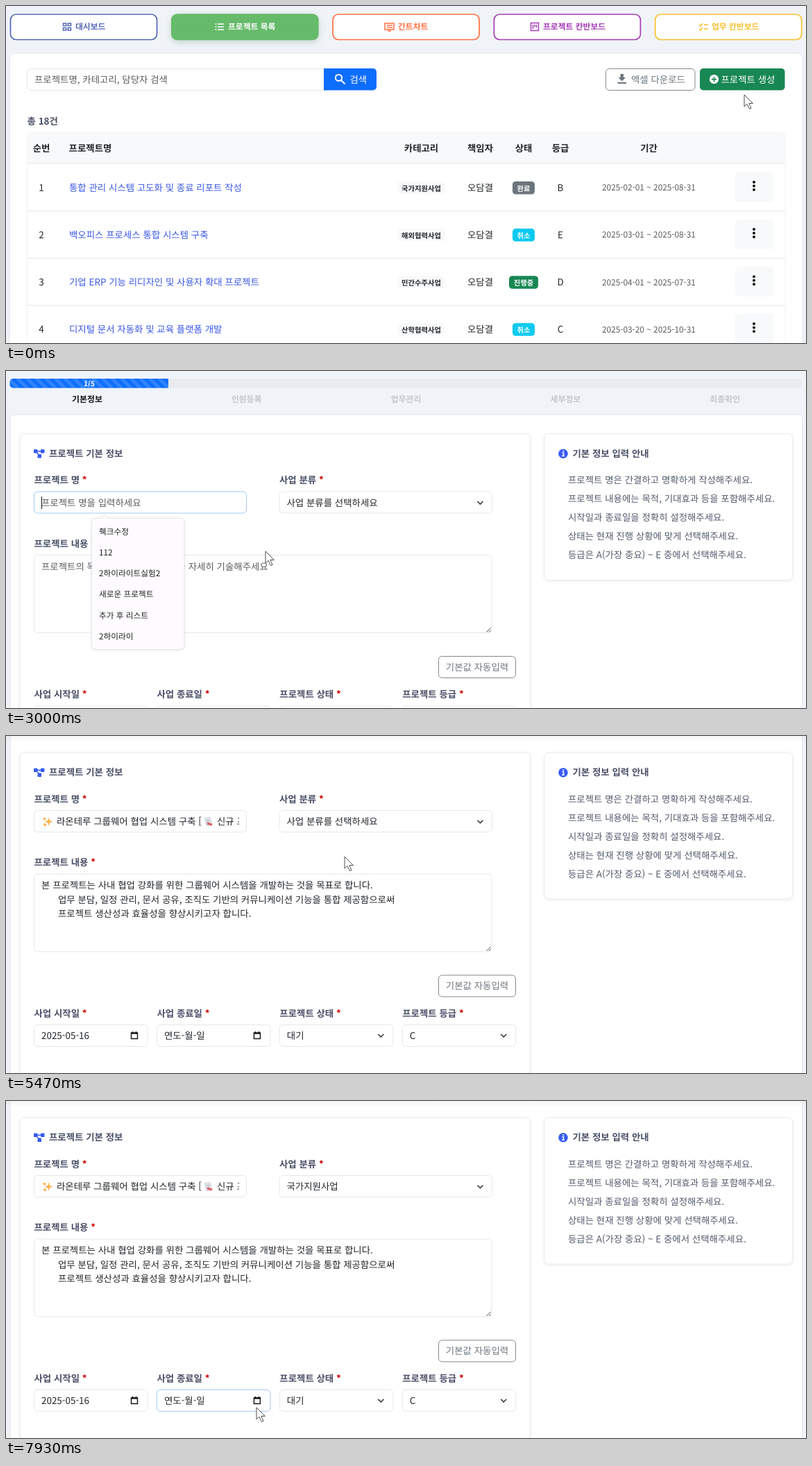
Write an HTML page that moves like this. It is 1153 px wide and 486 px high and loops after 8 s.

```html
<!DOCTYPE html>
<html lang="ko">
<head>
<meta charset="utf-8">
<style>
  html, body { margin: 0; width: 100%; height: 100%; overflow: hidden; background: #fefefe; }
  svg { display: block; width: 100%; height: 100%; }
  text { font-family: "Noto Sans CJK KR", "Noto Sans KR", "Noto Sans CJK", sans-serif; text-rendering: geometricPrecision; }
  .soft { filter: drop-shadow(0 1px 2px rgba(0,0,0,.08)); }
  .lift { filter: drop-shadow(0 3px 5px rgba(60,90,60,.22)); }
  .deep { filter: drop-shadow(0 12px 10px rgba(0,0,0,.16)); }
</style>
</head>
<body>
<svg id="stage" viewBox="0 0 1153 486" stroke-width=".85"></svg>
<script>
const INK = '#212529', SLATE = '#4b5068', GRAY = '#6c757d', HINT = '#595c60',
      LINE = '#dfe3e8', BLUE = '#365cf5', FOCUS = '#93bffe', SCROLL = 66.5, SIZE = 13.44;

// y is the visual middle of the line
const text = (x, y, s, fill = INK, size = SIZE, bold = 0, anchor = 'start') =>
  `<text x="${x}" y="${y + size * .37}" fill="${fill}" font-size="${size}" font-weight="${bold ? 700 : 400}" text-anchor="${anchor}">${s}</text>`;
const mid = (x, y, s, fill, size, bold) => text(x, y, s, fill, size, bold, 'middle');
const box = (x, y, w, h, fill, stroke = 'none', r = 5, more = '') =>
  `<rect x="${x}" y="${y}" width="${w}" height="${h}" rx="${r}" fill="${fill}" stroke="${stroke}" ${more}/>`;
const path = (d, stroke, w = 1.5, fill = 'none') =>
  `<path d="${d}" stroke="${stroke}" stroke-width="${w}" fill="${fill}"/>`;
const dot = (x, y, r, fill) => `<circle cx="${x}" cy="${y}" r="${r}" fill="${fill}"/>`;
const group = (id, s) => `<g id="${id}">${s}</g>`;

/* ---------- project list ---------- */
const tabs = [
  ['대시보드', '#5468b8', 100, 'M82.5 25h4.2v3.6h-4.2zM89.3 25h4.2v3.6h-4.2zM82.5 31.4h4.2V35h-4.2zM89.3 31.4h4.2V35h-4.2z'],
  ['프로젝트 목록', '#66bb6a', 320, 'M301.5 26h2M305 26h9M301.5 30h2M305 30h9M301.5 34h2M305 34h9'],
  ['간트차트', '#ff7043', 565, 'M546 25h13v9h-13zM550 36h5M549 28h8M549 31h8'],
  ['프로젝트 칸반보드', '#a63cb8', 774, 'M756.5 24.5h11v11h-11zM759.5 27v6M762 27v3M764.5 27v4'],
  ['업무 칸반보드', '#fbc02d', 1017, 'M999 27l2 2 3-4M999 33l2 2 3-4M1006 27h6M1006 33h6']
];
const rows = [
  ['통합 관리 시스템 고도화 및 종료 리포트 작성', '국가지원사업', '완료', GRAY, 'B', '2025-02-01 ~ 2025-08-31'],
  ['백오피스 프로세스 통합 시스템 구축', '해외협력사업', '취소', '#0dcaf0', 'E', '2025-03-01 ~ 2025-08-31'],
  ['기업 ERP 기능 리디자인 및 사용자 확대 프로젝트', '민간수주사업', '진행중', '#198754', 'D', '2025-04-01 ~ 2025-07-31'],
  ['디지털 문서 자동화 및 교육 플랫폼 개발', '산학협력사업', '취소', '#0dcaf0', 'C', '2025-03-20 ~ 2025-10-31']
];

const tab = ([name, color, x, icon], i) => {
  const on = i === 1, ink = on ? '#fff' : color;
  return box(6.5 + i * 232.3, 12, 211, 36.5, on ? color : '#fff', color, 8, `stroke-width="1.7" class="${on ? 'lift' : ''}"`)
    + path(icon, ink) + text(x, 30, name, ink, 11.8, 1);
};
const row = ([name, kind, state, color, grade, dates], i) => {
  const y = 262 + i * 68.1, w = state.length * 10 + 12;
  return mid(51, y, i + 1) + text(91, y, name, '#3a57e8')
    + box(564, y - 9, 69, 18, '#f8f9fa') + mid(598.5, y + 1, kind, INK, 10.3, 1)
    + mid(683.5, y, '오담결')
    + box(746 - w / 2, y - 9, w, 18.5, color, 'none', 4.5) + mid(746, y + 1, state, '#fff', 10.3, 1)
    + mid(799, y, grade) + mid(926.5, y, dates, HINT, 11.85)
    + box(1051, y - 22, 55, 42.5, '#f8f9fa', 'none', 4)
    + [-8, -2.5, 3].map(d => dot(1078, y + d, 2, '#111')).join('')
    + path(`M30.5 ${y + 33.5}H1123`, '#e6e8eb', 1);
};
const heads = [[51, '순번'], [121.5, '프로젝트명'], [598.5, '카테고리'], [683.5, '책임자'], [746, '상태'], [799, '등급'], [926.5, '기간']];

const list = box(0, 0, 1153, 486, '#f0f4f8', 'none', 0)
  + tabs.map(tab).join('')
  + box(6, 69, 1141.5, 440, '#fff', 'none', 6, 'class="soft"')
  + box(30.5, 90.5, 440, 31, '#fff', LINE) + text(41, 106, '프로젝트명, 카테고리, 담당자 검색', HINT)
  + path('M458 90h71a5 5 0 0 1 5 5v21.5a5 5 0 0 1-5 5h-71z', 'none', 0, '#0d6efd')
  + `<circle cx="479.5" cy="103.5" r="4.6" fill="none" stroke="#fff" stroke-width="2"/>` + path('M483 107l5.5 5.5', '#fff', 2.2)
  + text(495.5, 106, '검색', '#fff')
  + box(864.5, 90.5, 128.5, 31, '#fff', GRAY)
  + path('M885.5 98h4.5v5h3l-5.25 5.5-5.25-5.5h3zM881.5 110h12.5v2h-12.5z', 'none', 0, GRAY)
  + text(901, 106, '엑셀 다운로드', GRAY)
  + box(1000, 90, 122.5, 31.5, '#198754', 'none', 5, 'id="create"')
  + dot(1020.5, 105.7, 6.6, '#fff') + path('M1017 105.7h7M1020.5 102.2v7', '#198754', 1.7)
  + text(1030.5, 106, '프로젝트 생성', '#fff')
  + text(30.5, 166, '총 18건', SLATE, SIZE, 1)
  + box(30.5, 182, 1092.5, 330, '#fff', '#f0f1f3', 4)
  + box(30.5, 182, 1092.5, 45, '#f8f9fa', 'none', 4) + path('M30.5 227H1123', '#e6e8eb', 1)
  + heads.map(([x, s]) => mid(x, 205.5, s, INK, SIZE, 1)).join('')
  + rows.map(row).join('');

/* ---------- form ---------- */
const label = (x, y, s) => text(x, y, s + ' <tspan fill="#d00000">*</tspan>', SLATE, SIZE, 1);
const field = (id, x, y, w, h = 31) => box(x, y, w, h, '#fff', LINE, 5, `id="${id}"`);
const chevron = (x, y) => path(`M${x - 4} ${y - 2}l4 4 4-4`, '#343a40', 1.6);
const calendar = (x, y) => path(`M${x - 4.5} ${y - 4}h9v8.5h-9zM${x - 4.5} ${y - 3}h9M${x - 2.5} ${y - 6}v2M${x + 2.5} ${y - 6}v2`, '#111', 1.4);
const steps = ['기본정보', '인원등록', '업무관리', '세부정보', '최종확인'];
const tips = ['프로젝트 명은 간결하고 명확하게 작성해주세요.', '프로젝트 내용에는 목적, 기대효과 등을 포함해주세요.',
  '시작일과 종료일을 정확히 설정해주세요.', '상태는 현재 진행 상황에 맞게 선택해주세요.', '등급은 A(가장 중요) ~ E 중에서 선택해주세요.'];
const history = ['췍크수정', '112', '2하이라이트싫험2', '새로운 프로젝트', '추가 후 리스트', '2하이라이'];
const options = ['사업 분류를 선택하세요', '국가지원사업', '법인자체사업', '산학협력사업', '민간수주사업', '해외협력사업'];
const lows = [['사업 시작일', '2025-05-16'], ['사업 종료일', '연도-월-일'], ['프로젝트 상태', '대기'], ['프로젝트 등급', 'C']];
const spark = (x, y, r) => path(`M${x} ${y - r}Q${x} ${y} ${x + r} ${y}Q${x} ${y} ${x} ${y + r}Q${x} ${y} ${x - r} ${y}Q${x} ${y} ${x} ${y - r}`, '#f7a93b', 1, '#fbb848');

const filled = spark(61.5, 190, 5) + spark(55.5, 186, 2) + spark(56, 194.5, 2)
  + text(73, 190, '라온테루 그룹웨어 협업 시스템 구축 [')
  + path('M286.5 184.500l7.500-.5 3 11-8.500 1z', '#cfd5de', 1, '#e4e8ee') + path('M288.5 188h5M289 191h4', '#9aa4b2', 1)
  + path('M290 192.5l7 2', '#e0606c', 3)
  + `<clipPath id="edge"><path d="M40 174H336V206H40z"/></clipPath><g clip-path="url(#edge)">${text(304, 190, '신규 프로젝트')}</g>`
  + text(51, 282, '본 프로젝트는 사내 협업 강화를 위한 그룹웨어 시스템을 개발하는 것을 목표로 합니다.')
  + text(75, 302.3, '업무 분담, 일정 관리, 문서 공유, 조직도 기반의 커뮤니케이션 기능을 통합 제공함으로써')
  + text(75, 322.5, '프로젝트 생산성과 효율성을 향상시키고자 합니다.');

const bar = fill => path('M10.5 11H234v13.5H10.5a5 5 0 0 1-5-5V16a5 5 0 0 1 5-5z', 'none', 0, fill);
const lowField = ([name, value], i) => {
  const x = 40.5 + i * 176.9;
  return label(x, 466.5, name) + field('low' + i, x, 483, 163.5) + text(x + 10.5, 499, value)
    + (i < 2 ? calendar(x + 144.5, 498.5) : chevron(x + 146, 498.5));
};

const form = box(5.5, 11, 1142, 13.5, '#e9ecef')
  + bar('#0d6efd') + bar('url(#stripes)')
  + mid(120, 18.5, '1/5', '#fff', 10.2, 1)
  + steps.map((s, i) => mid(117 + i * 229.8, 41, s, i ? '#c3c7cc' : '#111', 11.9, 1)).join('')
  + box(6, 63, 1141.5, 700, '#fff', '#dbe0e6')
  + box(20, 90.5, 735.5, 463, '#fff', '#e6e9ed', 6, 'class="soft"')
  + box(776, 90.5, 357.5, 211, '#fff', '#e6e9ed', 6, 'class="soft"')
  + path('M40.5 113.5h4.5v4.5h-4.5zM50.5 113.5h4.5v4.5h-4.5zM46 120.5h4.5v4.5H46z', BLUE, 1, BLUE)
  + path('M44 115.7h7M44 117l3.5 4', BLUE, 1.4)
  + text(62, 119, '프로젝트 기본 정보', SLATE, SIZE, 1)
  + dot(803, 119.2, 6.8, BLUE) + path('M801.5 118h2v4.5M801 122.5h4M802.2 115.5h2', '#fff', 1.5)
  + text(816.5, 119, '기본 정보 입력 안내', SLATE, SIZE, 1)
  + tips.map((s, i) => text(810, 157.5 + i * 26.9, s, '#535a6c')).join('')
  + label(40.5, 157.5, '프로젝트 명') + field('name', 40.5, 174, 306)
  + label(394, 157.5, '사업 분류')
  + box(392.2, 172.2, 310, 34.6, 'none', '#c2dbfe', 7, 'id="ring" stroke-width="3.4"')
  + field('kind', 394, 174, 306.5) + chevron(683.5, 190)
  + group('kindText', text(404.5, 190, options[0]))
  + label(40.5, 249, '프로젝트 내용') + field('body', 40.5, 265.5, 659.5, 112)
  + path('M692.5 376.5l6-6M696 376.5l2.5-2.5', '#444', 1)
  + group('hints', text(51, 190, '프로젝트 명을 입력하세요', HINT) + text(51, 282, '프로젝트의 목적, 범위, 기대효과 등을 자세히 기술해주세요', HINT))
  + group('filled', filled)
  + group('auto', box(623.5, 411.5, 111, 31, '#fff', GRAY) + mid(679, 427, '기본값 자동입력', GRAY))
  + lows.map(lowField).join('')
  + group('caret', path('M51.5 181v18', '#111', 1))
  + group('history', `<g class="soft">${box(123.5, 212, 133.5, 189.5, '#fdfbfe', '#e3e0e6', 6)}${path('M136 212.5l6-5 6 5', '#e3e0e6', 1, '#fdfbfe')}</g>`
      + history.map((s, i) => text(134, 231.5 + i * 30.2, s, '#222', 11.7)).join(''))
  + group('menu', box(395.5, 206, 304.5, 157.5, '#fff', '#85888c', 4, 'class="deep"')
      + box(396, 207, 303.5, 26.2, '#1967d2', 'none', 0, 'id="pick"')
      + options.map((s, i) => `<g class="opt">${text(405, 220.3 + i * 26.3, s)}</g>`).join(''));

/* ---------- pointers ---------- */
const pointers = group('arrow', path('M0 0V17L4 13.4 7.5 20.5 10 19.3 6.8 12.5H12.3Z', '#222', .8, '#fff'))
  + group('beam', path('M-3.5-7h2.5l1 .7 1-.7h2.5M-3.5 7.5h2.5l1-.7 1 .7h2.5M0-6.5v13.5', '#000', 2))
  + group('hand', path('M-1.5 1.5Q0-1.5 1.5 1.5V7.5L8 9Q9.5 9.5 9.5 11.5V15L7.5 20H-1.5L-6 13Q-6 10.5-3.5 11.5L-1.5 13.5Z', '#222', .9, '#fff'));

const stage = document.getElementById('stage');
stage.innerHTML = `<defs>
  <pattern id="stripes" width="13.6" height="13.6" patternUnits="userSpaceOnUse">
    <path d="M0 6.8V13.6H6.8ZM0 0H6.8L13.6 6.8V13.6Z" fill="#fff" fill-opacity=".15"/></pattern>
  <linearGradient id="shade" x2="0" y2="1"><stop stop-color="#000" stop-opacity=".035"/><stop offset="1" stop-opacity="0"/></linearGradient>
</defs>`
  + group('list', list)
  + group('wait', box(0, 0, 1153, 486, '#fefefe', 'none', 0)
      + group('spin', path('M0-31.5A31.5 31.5 0 1 1-31.5 0', BLUE, 4)))
  + group('form', box(0, 0, 1153, 486, '#f0f4f8', 'none', 0) + group('page', form) + box(0, 0, 1153, 10, 'url(#shade)', 'none', 0, 'id="top"'))
  + group('pointer', pointers);

/* ---------- motion ---------- */
const $ = id => document.getElementById(id);
const show = (id, on) => $(id).style.display = on ? '' : 'none';
const set = (id, key, value) => $(id).setAttribute(key, value);
const within = (t, a, b) => t >= a && t < b;

function along(keys, t) {
  const i = keys.findIndex(k => k[0] > t);
  if (i < 0) return keys[keys.length - 1].slice(1);
  if (i === 0) return keys[0].slice(1);
  const a = keys[i - 1], b = keys[i], u = (t - a[0]) / (b[0] - a[0]), e = u * u * (3 - 2 * u);
  return a.slice(1).map((v, k) => v + (b[k + 1] - v) * e);
}

const route = [[70, 1064, 128], [270, 1054, 112], [600, 1054, 112], [1070, 843, 192], [1400, 720, 208],
  [2270, 335, 188], [2560, 230, 191], [2660, 230, 191], [3000, 374, 260], [3200, 374, 262], [3480, 301, 276], [4070, 301, 276],
  [4400, 540, 403], [4660, 672, 355], [4930, 672, 355], [5470, 488, 174], [5730, 430, 136], [5900, 430, 130],
  [6270, 467, 180], [6470, 467, 180], [7270, 296, 416], [7520, 350, 431], [7930, 361, 442]];
const scroll = [[3330, 0], [3730, 51], [3800, 51], [3980, SCROLL]];

function draw(t) {
  const [x, y] = along(route, t), [shift] = along(scroll, t);
  show('list', t < 670);
  show('wait', within(t, 670, 1600));
  show('form', t >= 1600);

  const onCreate = within(t, 140, 670);
  set('create', 'fill', onCreate ? '#157347' : '#198754');
  set('spin', 'transform', `translate(478.5 293) rotate(${65 + (t - 1070) * .36})`);
  set('stripes', 'patternTransform', `translate(${-(t % 1000) * .0136} 11)`);
  set('page', 'transform', `translate(0 ${-shift})`);
  set('top', 'opacity', shift / SCROLL);

  const typing = within(t, 2600, 3200);
  set('name', 'stroke', typing ? FOCUS : LINE);
  show('history', typing);
  show('caret', typing && (t - 2600) % 1000 < 500);

  const done = t >= 4760, onAuto = within(t, 4590, 5020);
  show('hints', !done);
  show('filled', done);
  const [rect, word] = $('auto').children;
  rect.setAttribute('fill', onAuto ? GRAY : '#fff');
  word.setAttribute('fill', onAuto ? '#fff' : GRAY);

  const focused = within(t, 5870, 7460);
  show('ring', focused);
  set('kind', 'stroke', focused ? FOCUS : LINE);
  show('menu', within(t, 5930, 6500));
  const pick = y < 166 ? 0 : 1;
  set('pick', 'y', 207 + pick * 26.3);
  document.querySelectorAll('.opt text').forEach((o, i) => o.setAttribute('fill', i === pick ? '#fff' : INK));
  $('kindText').firstChild.textContent = options[t < 6500 ? 0 : 1];
  set('low1', 'stroke', t >= 7460 ? FOCUS : LINE);

  const hand = onCreate || onAuto;
  const beam = within(t, 2260, 2800) || within(t, 3280, 4220);
  show('hand', hand);
  show('beam', beam);
  show('arrow', !hand && !beam);
  set('pointer', 'transform', `translate(${x} ${y})`);
}

function tick() {
  draw(performance.now() % 8000);
  requestAnimationFrame(tick);
}
tick();
</script>
</body>
</html>
```
